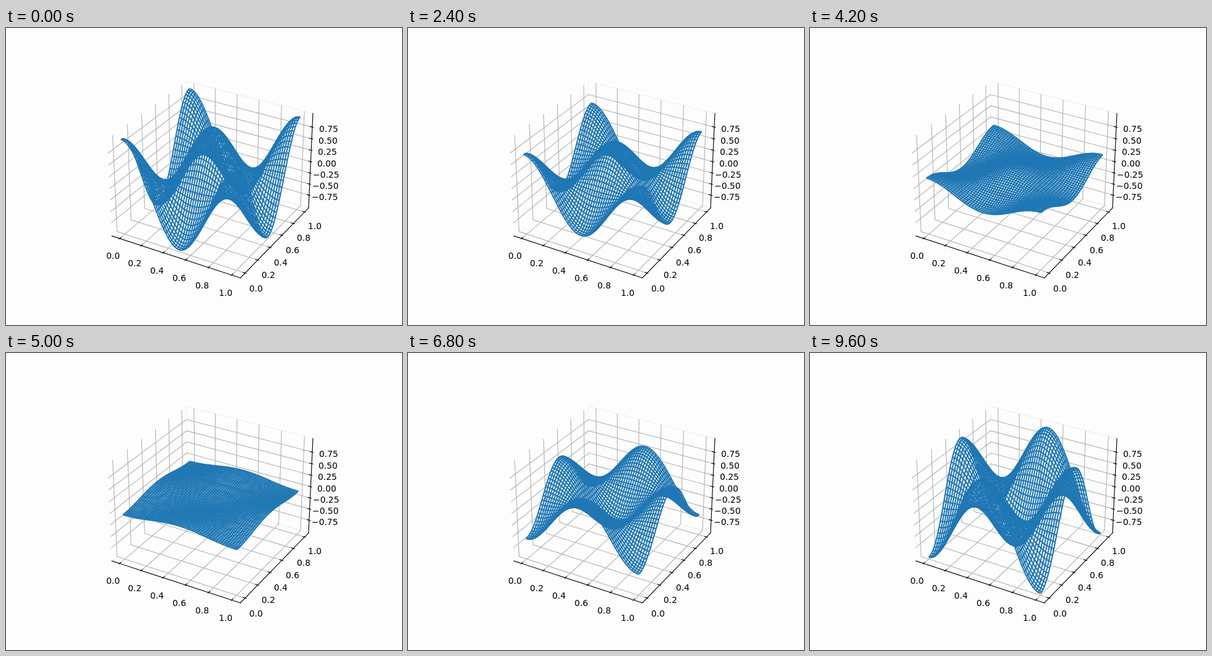
An HTML page for the animation above (9800 ms loop, 640x480 px).

```html
<!DOCTYPE html>
<html lang="en">
<head>
<meta charset="utf-8">
<title>Standing wave</title>
<style>
html, body { margin: 0; width: 100%; height: 100%; overflow: hidden; background: #fdfdfd; }
svg { display: block; width: 640px; height: 480px; }
path { fill: none; stroke-width: 1.11; }
text { font: 13.89px "DejaVu Sans", sans-serif; fill: #000; }
.ink { stroke-linecap: square; }
#wires path { stroke: #1f77b4; stroke-width: 2.083; stroke-linejoin: round; }
</style>
</head>
<body>
<svg viewBox="0 0 640 480">
  <g id="axes"></g>
  <g id="wires"></g>
</svg>
<script>
const STEP = 200, FRAMES = 49, CELLS = 50;
const ZMAX = Math.cos(Math.PI / 50);
const LO = -1 / 48, HI = 49 / 48;          // axis box, slightly outside the limits
const axes = document.getElementById('axes');
const wires = document.getElementById('wires');

// Data to unit box
const ux = x => (x + 0.05) / 1.1;
const uz = z => 0.5 + z / (2 * ZMAX);

// Unit box to screen: perspective camera at elevation 30, azimuth -60, distance 10
const S3 = Math.sqrt(3);
function project([u, v, w]) {
  const x = (u - 0.5) * 8 / 7, y = (v - 0.5) * 8 / 7, z = (w - 0.5) * 6 / 7;
  const right = x * S3 / 2 + y / 2;
  const up = -x / 4 + y * S3 / 4 + z * S3 / 2;
  const depth = 10 - (x * S3 / 4 - y * 0.75 + z / 2);
  const k = 369.6 / 0.185;
  return [143.2 + k * (right / depth + 0.095), 57.6 + k * (0.09 - up / depth)];
}

const toPath = pts =>
  'M' + pts.map(p => project(p).map(c => c.toFixed(2)).join(' ')).join('L');

function add(parent, name, attrs) {
  const el = document.createElementNS('http://www.w3.org/2000/svg', name);
  for (const key in attrs) el.setAttribute(key, attrs[key]);
  return parent.appendChild(el);
}

const line = (stroke, ...pts) => add(axes, 'path', { d: toPath(pts), stroke });
const inkLine = (...pts) => line('#000', ...pts).setAttribute('class', 'ink');

function label(value, digits, pos) {
  const str = Math.abs(value).toFixed(digits);
  const neg = value < 0;
  const width = 13.89 * (0.636 * (str.length - 1) + 0.318 + (neg ? 0.838 : 0));
  const [x, y] = project(pos);
  const el = add(axes, 'text', { x: Math.round(x - width / 2), y: Math.round(y + 11) });
  el.textContent = (neg ? '\u2212' : '') + str;
}

function drawAxes() {
  const xy = [0, 0.2, 0.4, 0.6, 0.8, 1];
  const zs = [-0.75, -0.5, -0.25, 0, 0.25, 0.5, 0.75];
  const out = 1 / 120, inn = 1 / 60, gap = 0.08643;
  const gray = '#b0b0b0';

  // Faint pane edges
  line('#f3f3f3', [LO, HI, LO], [LO, HI, HI]);
  line('#ececec', [LO, HI, LO], [HI, HI, LO], [HI, HI, HI], [LO, HI, HI]);

  for (const t of xy) {
    const u = ux(t);
    line(gray, [u, LO, LO], [u, HI, LO], [u, HI, HI]);
    line(gray, [HI, u, LO], [LO, u, LO], [LO, u, HI]);
  }
  for (const t of zs) {
    const w = uz(t);
    line(gray, [LO, LO, w], [LO, HI, w], [HI, HI, w]);
  }

  inkLine([LO, LO, LO], [HI, LO, LO]);
  inkLine([HI, LO, LO], [HI, HI, LO]);
  inkLine([HI, HI, LO], [HI, HI, HI]);

  for (const t of xy) {
    const u = ux(t);
    inkLine([u, LO - out, LO], [u, LO + inn, LO]);
    label(t, 1, [u, LO - gap, LO - gap]);
    inkLine([HI + out, u, LO], [HI - inn, u, LO]);
    label(t, 1, [HI + gap, u, LO - gap]);
  }
  for (const t of zs) {
    const w = uz(t);
    inkLine([HI + out, HI, w], [HI - inn, HI, w]);
    label(t, 2, [HI + gap, HI + gap, w]);
  }
}

const grid = Array.from({ length: CELLS + 1 }, (_, i) => i / CELLS);
const wave = s => Math.cos(2 * Math.PI * s);
const rows = grid.map(() => add(wires, 'path', {}));
const cols = grid.map(() => add(wires, 'path', {}));

function drawWave(frame) {
  const amp = Math.cos(Math.PI * (frame + 1) / 50);
  const point = (x, y) => [ux(x), ux(y), uz(amp * wave(x) * wave(y))];
  grid.forEach((s, i) => {
    rows[i].setAttribute('d', toPath(grid.map(x => point(x, s))));
    cols[i].setAttribute('d', toPath(grid.map(y => point(s, y))));
  });
}

let shown = -1;
const start = performance.now();
function tick() {
  const frame = Math.floor(Math.max(0, performance.now() - start) / STEP) % FRAMES;
  if (frame !== shown) drawWave(shown = frame);
  requestAnimationFrame(tick);
}

drawAxes();
tick();
</script>
</body>
</html>
```
